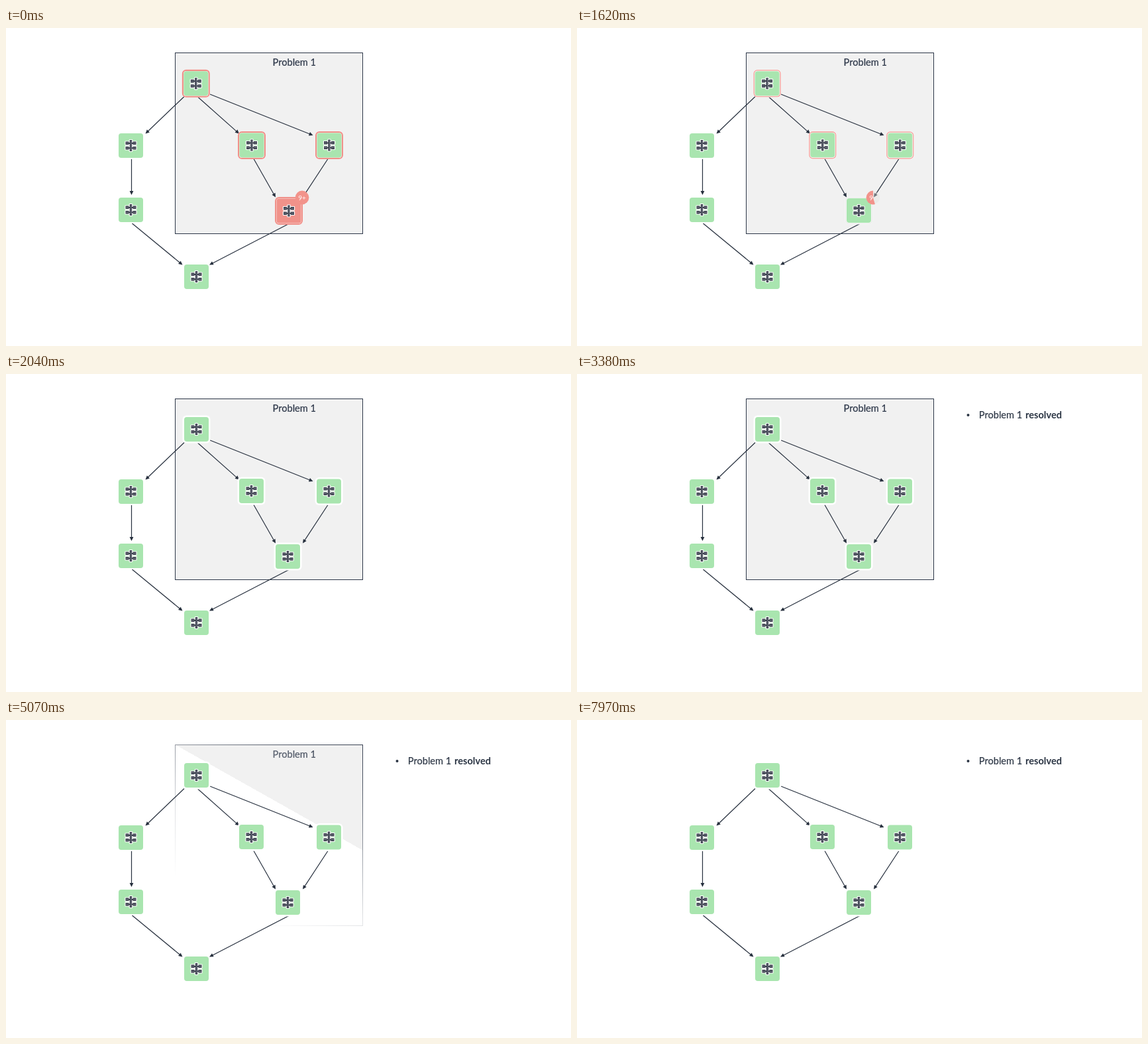
An HTML page for the animation above (8000 ms loop, 853 by 480 pixels).

```html
<!DOCTYPE html>
<html lang="en">
<head>
<meta charset="utf-8">
<title>Problem resolved</title>
<style>
  html, body { margin: 0; width: 100%; height: 100%; overflow: hidden; background: #fff; }
  svg { display: block; width: 100vw; height: 100vh; }
  text { font: 14.6px Lato, Carlito, sans-serif; }
  .ink { fill: #2b3544; }
  .bold { font-weight: 700; }
  .count { font-size: 10px; fill: #fff; text-anchor: middle; }
</style>
</head>
<body>
<svg viewBox="0 0 853 480">
  <defs>
    <linearGradient id="soft" gradientUnits="userSpaceOnUse">
      <stop offset="0" stop-color="#2c3648" stop-opacity="0"/>
      <stop offset=".25" stop-color="#2c3648" stop-opacity=".156"/>
      <stop offset=".5" stop-color="#2c3648" stop-opacity=".5"/>
      <stop offset=".75" stop-color="#2c3648" stop-opacity=".844"/>
      <stop offset="1" stop-color="#2c3648"/>
    </linearGradient>
    <linearGradient id="hard" gradientUnits="userSpaceOnUse">
      <stop offset=".5" stop-color="#f1f1f1" stop-opacity="0"/>
      <stop offset=".5" stop-color="#f1f1f1"/>
    </linearGradient>
    <clipPath id="pie"><path id="slice"/></clipPath>
    <g id="icon">
      <path d="M-1.7-8.5h3.4v17h-3.4z M-8-6h5v4.6h-5z M3-6h5v4.6h-5z M-8 1.4h5v4.6h-5z M3 1.4h5v4.6h-5z M-4-4.6h8v2h-8z M-4 2.7h8v2h-8z"
        fill="#383d4b" stroke="#fff" stroke-width="2.2" stroke-linejoin="round" paint-order="stroke"/>
      <path d="M-7.5-3.8h4 M3.5-3.8h4 M-7.5 3.7h4 M3.5 3.7h4 M.4-7.5v15" stroke="#858995" stroke-width=".9"/>
    </g>
    <g id="green">
      <rect x="-18.5" y="-18.5" width="37" height="37" rx="4" fill="#a9e5af"/>
      <use href="#icon"/>
    </g>
    <rect id="halo" x="-21" y="-21" width="42" height="42" rx="6" fill="#fff"/>
    <rect id="edge" x="-19.9" y="-19.9" width="39.8" height="39.8" rx="5" fill="none"/>
  </defs>

  <g id="frame">
    <rect x="255.5" y="37.5" width="283" height="273" fill="url(#hard)" stroke="url(#soft)"/>
    <text x="402.6" y="57" fill="url(#soft)" stroke="url(#soft)" stroke-width=".2">Problem 1</text>
  </g>
  <g id="arrows" stroke="#27303e" fill="#27303e" stroke-width="1.2"></g>
  <g id="nodes"></g>
  <g id="alert">
    <use href="#halo"/>
    <rect x="-18.5" y="-18.5" width="37" height="37" rx="3.5" fill="#f0928a"/>
    <use href="#icon"/>
    <use href="#edge" stroke="#f0918a" stroke-width="2.2"/>
  </g>
  <g id="healed">
    <use href="#halo"/>
    <use id="trace" href="#edge" stroke="#d6d6d6" stroke-width="1.4"/>
    <use href="#green"/>
  </g>
  <circle id="ghost" cx="447" cy="256" r="10" fill="#e2dfda"/>
  <g id="badge" clip-path="url(#pie)">
    <circle cx="447" cy="256" r="10.4" fill="#f2938b"/>
    <text class="count" x="447" y="259.5">9+</text>
  </g>
  <g id="note" class="ink">
    <circle cx="590.5" cy="62" r="2"/>
    <text x="606.8" y="67" stroke="#2b3544" stroke-width=".15">Problem 1</text>
    <text class="bold" x="677" y="67">resolved</text>
  </g>
</svg>
<script>
const LOOP = 8000, STEP = 70;
const $ = id => document.getElementById(id);
const NS = 'http://www.w3.org/2000/svg';
const clamp = v => Math.max(0, Math.min(1, v));
const show = (el, on) => el.setAttribute('visibility', on ? 'visible' : 'hidden');

function set(el, attrs) {
  for (const k in attrs) el.setAttribute(k, attrs[k]);
  return el;
}
function add(parent, tag, attrs) {
  return parent.appendChild(set(document.createElementNS(NS, tag), attrs));
}

function arrow(x1, y1, x2, y2) {
  const a = Math.atan2(y2 - y1, x2 - x1), c = Math.cos(a), s = Math.sin(a);
  add($('arrows'), 'line', { x1, y1, x2: x2 - 4 * c, y2: y2 - 4 * s });
  add($('arrows'), 'path', {
    d: 'M0 0L-6-2.9V2.9Z', stroke: 'none',
    transform: `translate(${x2} ${y2}) rotate(${a * 180 / Math.PI})`
  });
}
[
  [269, 103.5, 210.5, 159.5], [289.5, 104, 352, 159.5], [308, 100, 463.5, 162],
  [189.5, 198, 189.5, 252], [374, 197.5, 407, 255.5], [486, 197.5, 448, 255.5],
  [190.5, 295, 266.5, 357.5], [427, 295.5, 307, 357.5]
].forEach(p => arrow(...p));

for (const [x, y] of [[188.5, 177.5], [188.5, 274.5], [287.5, 375.5]])
  add($('nodes'), 'use', { href: '#green', x, y });

// affected nodes: start x, y and end x, y
const marked = [
  [286.8, 83.8, 287.5, 83.5], [371, 177, 370.5, 176.5], [488, 177, 487.5, 177]
].map(pos => {
  const g = add($('nodes'), 'g', {});
  add(g, 'use', { href: '#halo' });
  const ring = add(g, 'use', { href: '#edge', stroke: '#f0918a' });
  add(g, 'use', { href: '#green' });
  return { pos, g, ring };
});
set($('alert'), { transform: 'translate(427 276)' });
set($('healed'), { transform: 'translate(425.5 275.5)' });

// steps already taken in a stepped change that starts at the given time
const steps = (t, start, n) =>
  t < start ? 0 : Math.min(n, Math.floor((t - start) / STEP) + 1);

function pie(p) {
  const a = 2 * Math.PI * p, r = 13, cx = 447, cy = 256;
  if (p <= 0) return 'M430 240h34v34h-34z';
  return `M${cx} ${cy}L${cx + r * Math.sin(a)} ${cy - r * Math.cos(a)}` +
    `A${r} ${r} 0 ${p < .5 ? 1 : 0} 1 ${cx} ${cy - r}Z`;
}

function recover(p) {
  for (const { pos: [x1, y1, x2, y2], g, ring } of marked) {
    set(g, { transform: `translate(${x1 + (x2 - x1) * p} ${y1 + (y2 - y1) * p})` });
    set(ring, { opacity: 1 - p * p, 'stroke-width': 2.2 - 1.5 * p });
  }
  const heal = clamp(p * 2.2);
  show($('alert'), heal < 1);
  set($('healed'), { opacity: heal });
  set($('trace'), { opacity: 1 - p });
  set($('slice'), { d: pie(p) });
  show($('badge'), p < 1);
  set($('ghost'), { opacity: p > 0 ? .75 * (1 - p) : 0 });
}

// diagonal wipe towards the upper right with a soft edge
function wipe(k) {
  const from = k < 5 ? -673 + 94.6 * k : -200 + 70 * (k - 5);
  const at = s => [255 + .563 * s / 1.317, 37 - s / 1.317];
  const [x1, y1] = at(from), [x2, y2] = at(from + 400);
  for (const id of ['soft', 'hard']) set($(id), { x1, y1, x2, y2 });
}

function draw(t) {
  recover(steps(t, 1340, 11) / 11);
  show($('note'), t >= 3380);
  wipe(steps(t, 4790, 9));
  show($('frame'), t < 7970);
}

let begin;
function tick(now) {
  begin ??= now;
  draw((now - begin) % LOOP);
  requestAnimationFrame(tick);
}
draw(0);
requestAnimationFrame(tick);
</script>
</body>
</html>
```
